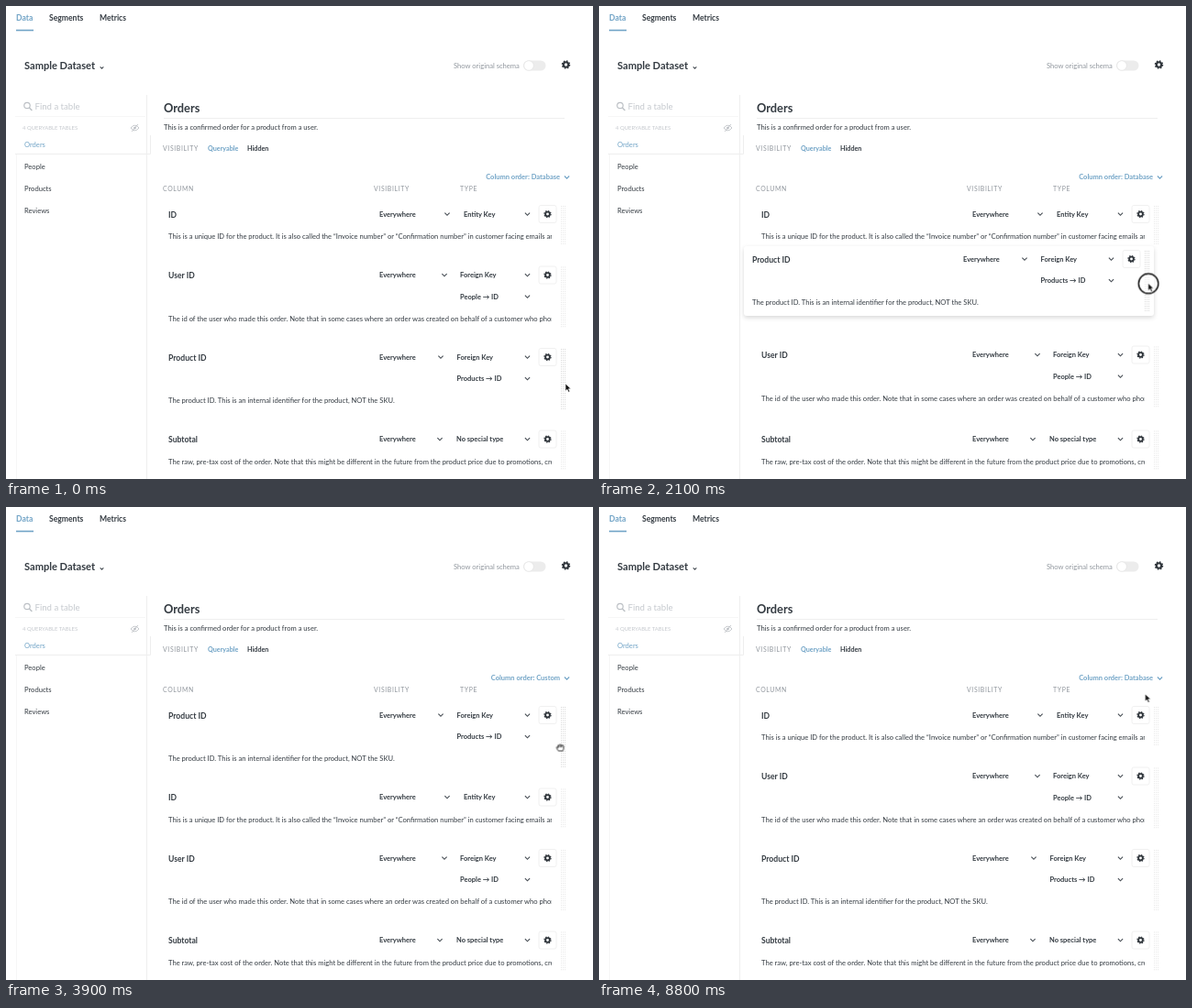
Animation of 640x516 px, one loop 9.4 s. Source, as an HTML page:

```html
<!DOCTYPE html>
<html lang="en">
<head>
<meta charset="utf-8">
<title>Column ordering</title>
<style>
html, body { margin: 0; width: 100%; height: 100%; overflow: hidden; background: #fff; }
svg { display: block; }
text { font-family: Lato, sans-serif; fill: #343b42; white-space: pre; }
.bold { font-weight: 700; }
.blue { fill: #70a3c6; }
.gray { fill: #90969d; }
.pale { fill: #c5c9ce; }
.wide { letter-spacing: .65px; }
.end { text-anchor: end; }
.line { fill: none; stroke: #eee; }
.chevron { fill: none; stroke: #454c53; stroke-width: 1.15; }
.grip { stroke: #dcdcdc; stroke-width: .8; stroke-dasharray: .9 1.5; }
.lift { height: 100%; border-radius: 3px; box-shadow: 0 2px 5px rgba(0,0,0,.16); }
.menu { height: 100%; border-radius: 3px; background: #fff; box-shadow: 0 1px 5px rgba(0,0,0,.17); }
</style>
</head>
<body>
<svg id="stage" width="640" height="516" viewBox="0 0 640 516"></svg>
<script>
const LOOP = 9400;
const stage = document.getElementById('stage');
const sheet = document.head.appendChild(document.createElement('style'));

function add(parent, tag, attrs = {}) {
  const el = document.createElementNS('http://www.w3.org/2000/svg', tag);
  for (const key in attrs) el.setAttribute(key, attrs[key]);
  return parent.appendChild(el);
}
const group = (parent, x = 0, y = 0) => add(parent, 'g', { transform: `translate(${x} ${y})` });
const path = (parent, d, attrs) => add(parent, 'path', { d, ...attrs });

// y is the middle of the capital letters
function label(parent, x, y, size, words, kind = '') {
  const el = add(parent, 'text', { x, y: y + size * .36, 'font-size': size, class: kind });
  el.textContent = words;
  return el;
}

function box(parent, x, y, width, height, kind) {
  const holder = add(parent, 'foreignObject', { x, y, width, height, style: 'overflow:visible' });
  const div = document.createElement('div');
  div.className = kind;
  holder.append(div);
  return holder;
}

const chevron = (parent, x, y, kind = 'chevron', s = 2.6) =>
  path(parent, `M${x - s} ${y - s / 2}l${s} ${s}l${s} ${-s}`, { class: kind });

function gear(parent, x, y, r) {
  const ring = { cx: x, cy: y, fill: 'none', stroke: '#30363c' };
  const tooth = Math.PI * r / 8;
  add(parent, 'circle', { ...ring, r: r * .58, 'stroke-width': r * .46 });
  add(parent, 'circle', { ...ring, r: r * .86, 'stroke-width': r * .3, 'stroke-dasharray': `${tooth * .86}` });
}

// Held keyframes, given as [milliseconds, declarations]
let tracks = 0;
function animate(el, frames) {
  const name = 'track' + tracks++;
  const steps = frames.map(([ms, css]) => `${ms / LOOP * 100}%{${css}}`).join('');
  sheet.append(`@keyframes ${name}{${steps}}\n`);
  el.style.animation = `${name} ${LOOP}ms step-end infinite`;
}
const move = (el, points) =>
  animate(el, points.map(([ms, x, y]) => [ms, `transform:translate(${x}px,${y}px)`]));
const show = (el, ...spans) =>
  animate(el, [[0, 'opacity:0'], ...spans.flatMap(([from, to]) => [[from, 'opacity:1'], [to, 'opacity:0']])]);

// Page header
label(stage, 11, 13, 8.6, 'Data', 'bold blue');
label(stage, 47, 13, 8.6, 'Segments', 'bold');
label(stage, 102, 13, 8.6, 'Metrics', 'bold');
add(stage, 'rect', { x: 11, y: 25.7, width: 19, height: 1.6, class: 'blue' });
label(stage, 20, 65.5, 11.1, 'Sample Dataset', 'bold');
chevron(stage, 104.5, 67.3, 'chevron', 1.8);
label(stage, 488, 65, 7.6, 'Show original schema', 'gray');
add(stage, 'rect', { x: 564, y: 59.5, width: 24.5, height: 11, rx: 5.5, fill: '#ececec' });
add(stage, 'circle', { cx: 570, cy: 65, r: 5.3, fill: '#fff', stroke: '#e2e2e2', 'stroke-width': .7 });
gear(stage, 610.5, 64, 4.7);

// Sidebar
path(stage, 'M153.5 97V516', { class: 'line', stroke: '#e9e9e9' });
path(stage, 'M11.5 162V516M10 120.5H152', { class: 'line', style: 'stroke:#f6f6f6' });
path(stage, 'M10 161.5H157.5V141', { class: 'line' });
add(stage, 'circle', { cx: 23, cy: 108.5, r: 3.2, fill: 'none', stroke: '#bcc0c5', 'stroke-width': 1.2 });
path(stage, 'M25.4 111l3 3', { stroke: '#bcc0c5', 'stroke-width': 1.4 });
label(stage, 31.5, 109.5, 9.6, 'Find a table', 'pale');
label(stage, 18, 133, 5.9, '4 QUERYABLE TABLES', 'pale');
path(stage, 'M136 133q4.5-5.6 9 0q-4.5 5.6-9 0M137 137l7-8', { fill: 'none', stroke: '#b9bdc2', 'stroke-width': .8 });
add(stage, 'circle', { cx: 140.5, cy: 133, r: 1.3, fill: '#b9bdc2' });
['Orders', 'People', 'Products', 'Reviews'].forEach((name, i) =>
  label(stage, 20, 151.5 + 24 * i, 7.6, name, i ? '' : 'blue'));

// Table heading
label(stage, 172, 111, 12.8, 'Orders', 'bold');
path(stage, 'M172 122.5H609', { class: 'line' });
label(stage, 172, 132.5, 7.6, 'This is a confirmed order for a product from a user.');
label(stage, 171, 155.5, 6.9, 'VISIBILITY', 'gray wide');
label(stage, 220, 155.5, 7.2, 'Queryable', 'bold blue');
label(stage, 263, 155.5, 7.2, 'Hidden', 'bold');
const byDatabase = label(stage, 604, 186.5, 7.5, 'Column order: Database', 'bold blue end');
const byCustom = label(stage, 604, 186.5, 7.5, 'Column order: Custom', 'bold blue end');
chevron(stage, 611.5, 186.8).style.stroke = '#70a3c6';
label(stage, 171, 199.5, 6.9, 'COLUMN', 'gray wide');
label(stage, 401, 199.5, 6.9, 'VISIBILITY', 'gray wide');
label(stage, 495, 199.5, 6.9, 'TYPE', 'gray wide');
show(byCustom, [3200, 8700]);
animate(byDatabase, [[0, 'opacity:1'], [3200, 'opacity:0'], [8700, 'opacity:1']]);

// Column rows
function select(parent, x, y, words, left, arrow, right) {
  add(parent, 'rect', { x: left, y: y - 11, width: right - left, height: 23, fill: '#fff' });
  label(parent, x, y, 7.5, words, 'bold');
  chevron(parent, arrow, y);
}

function row({ y, name, note, arrow, typeX, type, target }) {
  const moving = group(stage);
  const at = group(moving, 0, y);
  label(at, 177, .5, 8.6, name, 'bold');
  select(at, 407, 0, 'Everywhere', 398, arrow, 486);
  select(at, typeX, 0, type, 487, 568.5, 576);
  if (target) select(at, typeX, 23.5, target, 487, 568.5, 576);
  add(at, 'rect', { x: 581, y: -9.5, width: 19, height: 19, rx: 2, fill: '#fff', stroke: '#f0f0f0' });
  gear(at, 590.5, 0, 4.1);
  const field = add(at, 'svg', { x: 177, y: target ? 38 : 15, width: 418, height: 20 });
  label(field, 0, 9.6, 7.6, note);
  const grip = path(at, [605.5, 607.5, 609.5].map(x => `M${x} -9V${target ? 57 : 34}`).join(''), { class: 'grip' });
  return { moving, at, grip };
}

const id = row({ y: 227, name: 'ID', arrow: 481, typeX: 499, type: 'Entity Key',
  note: 'This is a unique ID for the product. It is also called the “Invoice number” or “Confirmation number” in customer facing emails and receipts' });
const user = row({ y: 293.5, name: 'User ID', arrow: 478, typeX: 495, type: 'Foreign Key', target: 'People → ID',
  note: 'The id of the user who made this order. Note that in some cases where an order was created on behalf of a customer who phoned in' });
row({ y: 472.5, name: 'Subtotal', arrow: 473, typeX: 491, type: 'No special type',
  note: 'The raw, pre-tax cost of the order. Note that this might be different in the future from the product price due to promotions, credits' });
const product = row({ y: 383, name: 'Product ID', arrow: 474, typeX: 491.5, type: 'Foreign Key', target: 'Products → ID',
  note: 'The product ID. This is an internal identifier for the product, NOT the SKU.' });
const lift = box(product.at, 168, -14, 447, 75.5, 'lift');

const drag = [
  [1700, -2, -8], [1800, -7, -31], [1900, -10.3, -59.5], [2000, -11, -85], [2100, -10, -107],
  [2200, -9, -125], [2300, -8, -139], [2400, -7, -147], [2500, -6, -150], [2600, -5.5, -151]
];
move(product.moving, [[0, 0, 0], ...drag, [2800, -3, -153.5], [2900, -1, -155], [3000, 0, -156], [8700, 0, 0]]);
move(user.moving, [[0, 0, 0], [1900, 0, 10], [2000, 0, 67], [2100, 0, 87], [2200, 0, 89.5], [8700, 0, 0]]);
move(id.moving, [[0, 0, 0], [2300, 0, 27], [2400, 0, 75.5], [2500, 0, 88.7], [2600, 0, 89.5], [8700, 0, 0]]);
show(lift, [1700, 3000]);
animate(product.grip, [[0, 'stroke:#c4c4c4'], [5900, 'stroke:#dcdcdc']]);

// Order menu
const menu = group(stage);
box(menu, 453, 195.5, 161, 86.5, 'menu');
const bar = y => add(menu, 'rect', { x: 457, y, width: 153, height: 17.5, rx: 1.5, fill: '#68a9e5' });
const hover = bar(200.5);
bar(240);
['Database', 'Alphabetical', 'Custom', 'Smart'].forEach((name, i) => {
  const item = label(menu, 466, 209.2 + 19.9 * i, 7.5, name, 'bold');
  if (i === 2) item.style.fill = '#fff';
  if (i === 0) animate(item, [[0, 'fill:#343b42'], [7900, 'fill:#fff'], [8700, 'fill:#343b42']]);
});
show(hover, [7900, 8700]);
animate(menu, [[0, 'opacity:0'], [6500, 'opacity:.5'], [6600, 'opacity:1'], [8700, 'opacity:0']]);

// Pointer
const pointer = group(stage);
const ring = add(pointer, 'circle', { cx: .3, cy: .3, r: 10.8, fill: '#fff', 'fill-opacity': .45, stroke: '#111', 'stroke-width': 1.5 });
const arrow = path(pointer, 'M0 0V8l1.9-1.7 1.3 2.9 1.5-.7-1.3-2.8H6Z', { fill: '#111', stroke: '#fff', 'stroke-width': .6 });
const beam = path(pointer, 'M-1.6-3.6Q0-3.6 0-2.6Q0-3.6 1.6-3.6M0-2.6V2.8M-1.6 3.8Q0 3.8 0 2.8Q0 3.8 1.6 3.8', { fill: 'none', stroke: '#111', 'stroke-width': .8 });
const hand = path(pointer, 'M-2.2 3.6Q-4.6.6-4.2-.5Q-3.3-1.2-2.4.2L-2.7-2.5Q-1.8-3.6-1.2-2.5Q-.6-4.3.3-2.8Q1.3-4 1.9-2.4Q3.2-3.1 3.5-1.5Q3.8 1.5 2.6 3.6ZM-1.2-2.5L-.9-.4M.4-2.8V-.5M1.9-2.4L1.7-.4', { fill: '#fff', stroke: '#222', 'stroke-width': .9 });

move(pointer, [
  [0, 610, 412], ...drag.map(([ms, x, y]) => [ms, 608.7 + x, 411.5 + y + (ms > 2200 ? 2 : -2)]),
  [2800, 604.5, 262.5], [5800, 605, 252], [5900, 608, 230], [6000, 613, 204], [6100, 616, 188],
  [6200, 617, 182], [6700, 616, 183], [6800, 613.5, 185], [6900, 612, 186],
  [7700, 608.5, 190], [7800, 604, 196], [7900, 599, 201], [8000, 596.5, 203.5], [8100, 595.5, 204],
  [9399, 595.5, 204]
]);
animate(ring, [[0, 'opacity:0'], [1300, 'opacity:1;r:10.8px'], [1900, 'opacity:1;r:8.2px'],
  [2100, 'opacity:1;r:10.8px'], [2800, 'opacity:0'], [6400, 'opacity:1'], [6700, 'opacity:0'],
  [8600, 'opacity:1'], [8700, 'opacity:0']]);
show(beam, [1900, 2100]);
show(hand, [2800, 5800]);
animate(arrow, [[0, 'opacity:1'], [1900, 'opacity:0'], [2100, 'opacity:1'], [2800, 'opacity:0'], [5800, 'opacity:1']]);
</script>
</body>
</html>
```
